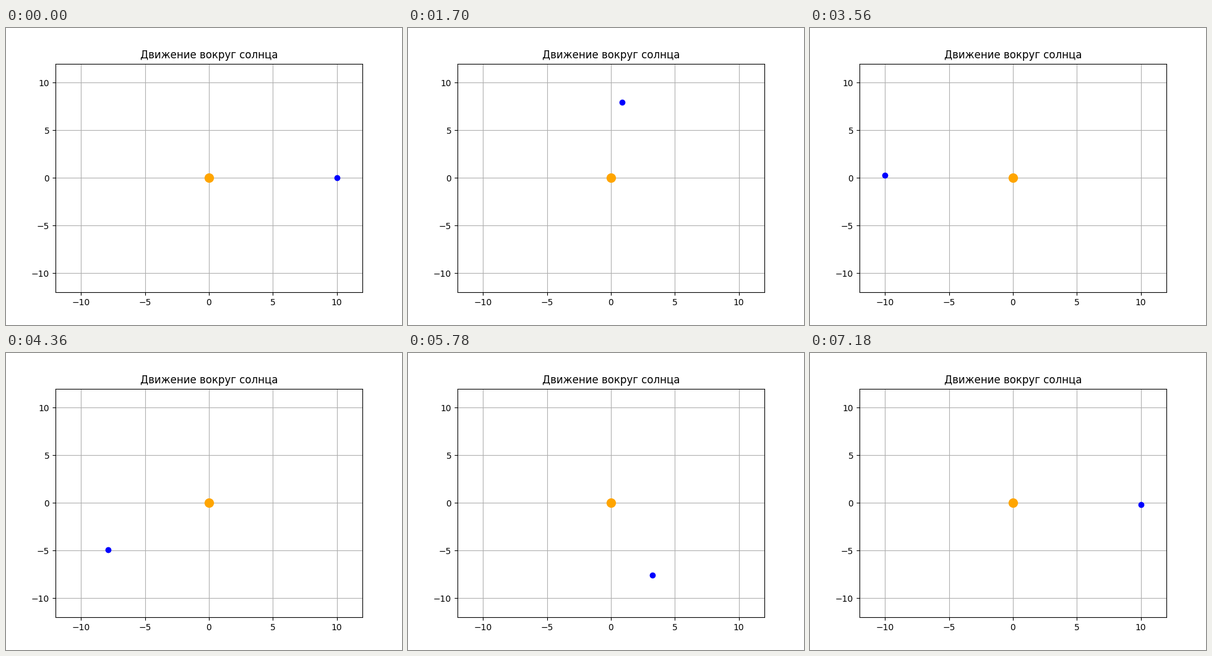
A matplotlib script for the animation above (7200 ms loop, 640 by 480 pixels).

```python
import numpy as np
import matplotlib.pyplot as plt
from matplotlib.animation import FuncAnimation

FRAMES = 360
INTERVAL = 20
SEMI_X, SEMI_Y = 10, 8
LIMIT = 12

fig, ax = plt.subplots(figsize=(6.4, 4.8), dpi=100)
ax.set_xlim(-LIMIT, LIMIT)
ax.set_ylim(-LIMIT, LIMIT)
ax.set_title("Движение вокруг солнца")
ax.grid(True)

sun, = ax.plot([0], [0], "o", color="orange", markersize=10)
planet, = ax.plot([SEMI_X], [0], "o", color="blue", markersize=6)


def update(frame):
    """Place the planet on its elliptical orbit, one degree per frame."""
    angle = 2 * np.pi * frame / FRAMES
    planet.set_data([SEMI_X * np.cos(angle)], [SEMI_Y * np.sin(angle)])
    return planet,


anim = FuncAnimation(fig, update, frames=FRAMES, interval=INTERVAL,
                     repeat=True, repeat_delay=0)
plt.show()
```
